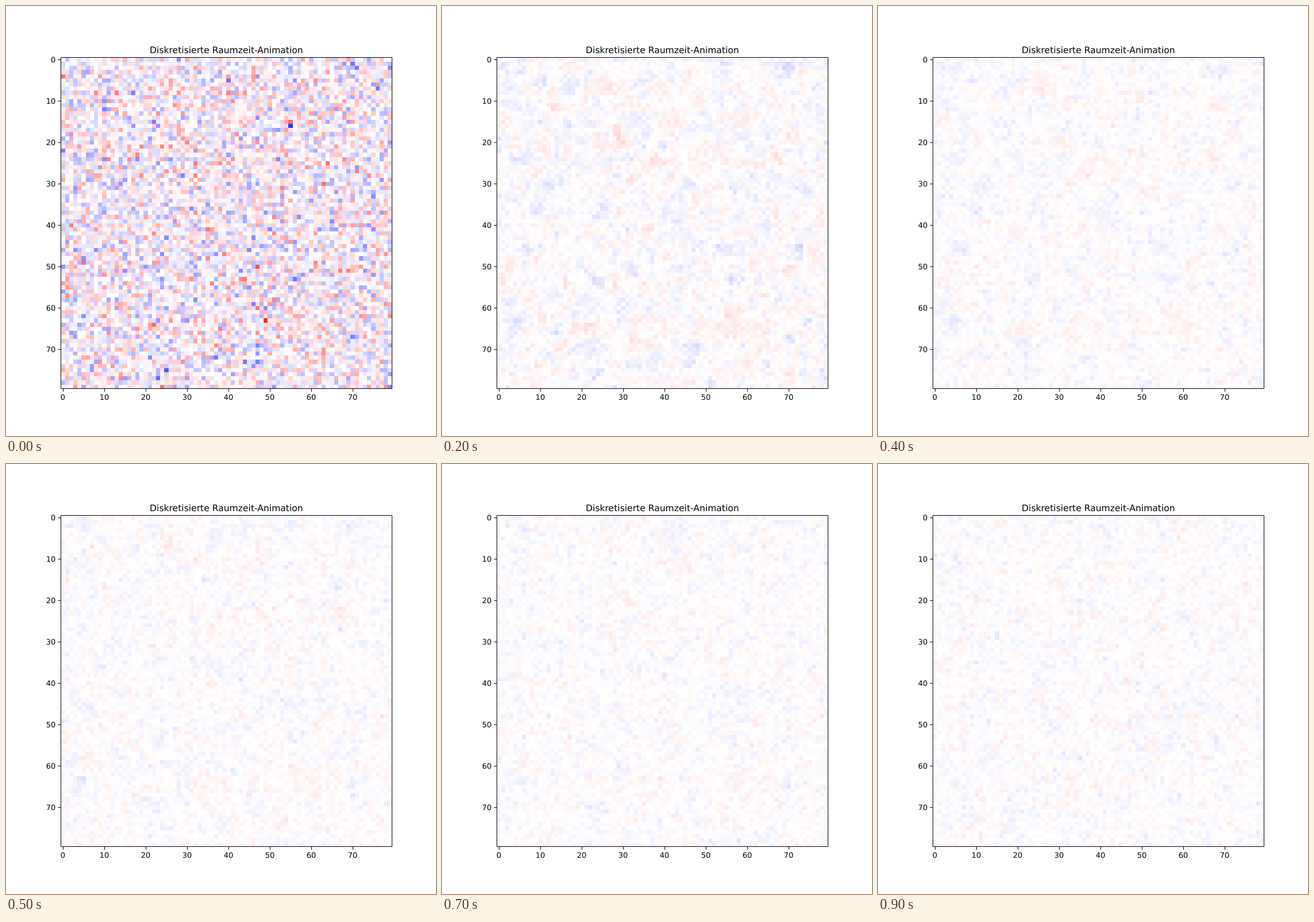
Animation, 748 px wide and 748 px high, one loop 1000 ms. Source, as an HTML page with a canvas:

```html
<!DOCTYPE html>
<html lang="de">
<head>
<meta charset="utf-8">
<title>Diskretisierte Raumzeit-Animation</title>
<style>
  html, body { margin: 0; width: 100%; height: 100%; overflow: hidden; background: #fff; }
  canvas, svg { position: absolute; left: 0; top: 0; width: 748px; height: 748px; }
  text { font: 12.99px "DejaVu Sans", sans-serif; fill: #000; text-rendering: geometricPrecision; }
  .title { font-size: 15.58px; }
  .x, .title { text-anchor: middle; }
  .y { text-anchor: end; }
  path { stroke: #000; stroke-width: 1; fill: none; }
</style>
</head>
<body>
<canvas id="field" width="748" height="748"></canvas>
<svg id="axes" viewBox="0 0 748 748">
  <path d="M95.5 89.5H671.5V665.5H95.5Z"/>
  <text class="title" x="383.4" y="82">Diskretisierte Raumzeit-Animation</text>
</svg>
<script>
const N = 80, STEPS = 10, STEP_MS = 100;
const LEFT = 95.39, TOP = 89.76, CELL = 7.2;
const SPREAD = 0.18, NOISE = 0.028, DECAY = 0.8;

// Seeded generator, so that every loop shows the same field
let seed = 20417;
function random() {
  seed = (seed + 0x6D2B79F5) | 0;
  let t = Math.imul(seed ^ (seed >>> 15), 1 | seed);
  t = (t + Math.imul(t ^ (t >>> 7), 61 | t)) ^ t;
  return ((t ^ (t >>> 14)) >>> 0) / 4294967296;
}

function gauss() {
  return Math.sqrt(-2 * Math.log(1 - random())) * Math.cos(2 * Math.PI * random());
}

// Mean of each cell and its four neighbours, damped, plus fresh noise
function nextField(u) {
  const at = (c, r) => u[((r + N) % N) * N + (c + N) % N];
  return u.map((v, i) => {
    const c = i % N, r = Math.floor(i / N);
    const sum = v + at(c - 1, r) + at(c + 1, r) + at(c, r - 1) + at(c, r + 1);
    return DECAY * sum / 5 + NOISE * gauss();
  });
}

const fields = [Array.from({ length: N * N }, () => SPREAD * gauss())];
while (fields.length < STEPS) fields.push(nextField(fields[fields.length - 1]));

// Blue below zero, white at zero, red above
function color(v) {
  const w = Math.round(255 * (1 - Math.min(1, Math.abs(v))));
  return v > 0 ? `rgb(255,${w},${w})` : `rgb(${w},${w},255)`;
}

const ctx = document.getElementById("field").getContext("2d");
const edge = (start, i) => Math.round(start + i * CELL);

function draw(u) {
  for (let r = 0; r < N; r++) {
    const y = edge(TOP, r), h = edge(TOP, r + 1) - y;
    for (let c = 0; c < N; c++) {
      const x = edge(LEFT, c);
      ctx.fillStyle = color(u[r * N + c]);
      ctx.fillRect(x, y, edge(LEFT, c + 1) - x, h);
    }
  }
}

const axes = document.getElementById("axes");
function add(tag, attrs, label = "") {
  const el = document.createElementNS("http://www.w3.org/2000/svg", tag);
  for (const k in attrs) el.setAttribute(k, attrs[k]);
  el.textContent = label;
  axes.append(el);
}

for (let k = 0; k < N; k += 10) {
  const x = LEFT + (k + 0.5) * CELL, y = TOP + (k + 0.5) * CELL;
  add("path", { d: `M${Math.round(x) + 0.5} 666v5M95.5 ${Math.round(y) + 0.5}h-5` });
  add("text", { class: "x", x, y: 685 }, k);
  add("text", { class: "y", x: 86.3, y: Math.round(y + 4.7) }, k);
}

let shown = -1;
function tick(now) {
  const i = Math.floor(now / STEP_MS) % STEPS;
  if (i !== shown) draw(fields[shown = i]);
  requestAnimationFrame(tick);
}
draw(fields[0]);
requestAnimationFrame(tick);
</script>
</body>
</html>
```
